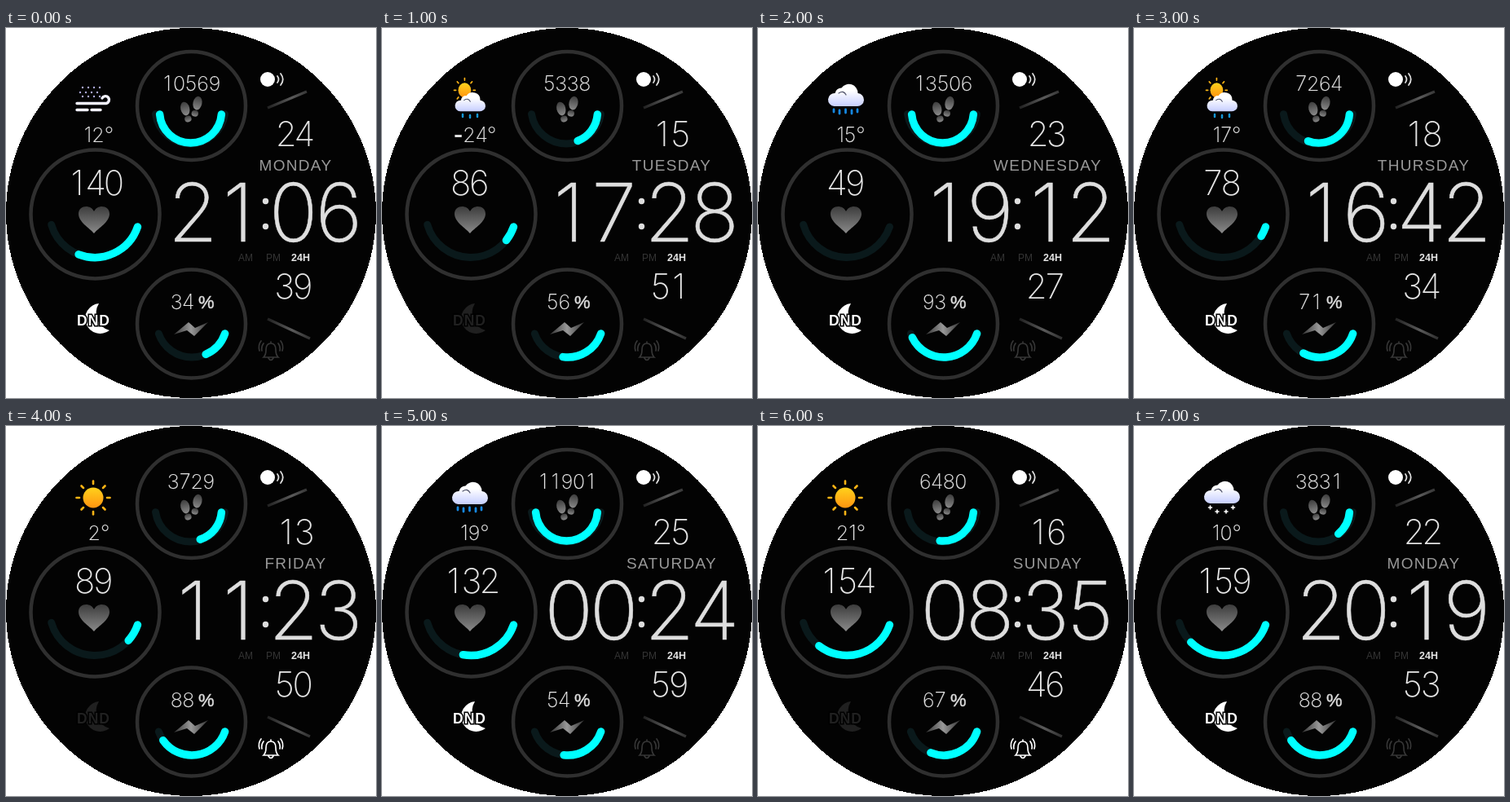
Animation, 454 px wide and 454 px high, one loop 8000 ms. Source, as an HTML page:

```html
<!DOCTYPE html>
<html lang="en">
<head>
<meta charset="utf-8">
<title>Watch face</title>
<style>
html, body { margin: 0; width: 100%; height: 100%; overflow: hidden; background: #fff; }
svg { display: block; width: 454px; height: 454px; }
text { fill: #e4e4e4; }
.num { font-family: Inter, Lato, sans-serif; font-weight: 200; text-anchor: middle; }
.time { font-size: 99px; fill: #dedede; stroke: #dedede; stroke-width: .6px; }
.big { font-size: 42px; }
.small { font-size: 25px; stroke: #e4e4e4; stroke-width: .15px; }
.label { font-family: "Liberation Sans", Arial, sans-serif; }
#day { font-size: 19px; letter-spacing: 1.3px; fill: #999; text-anchor: middle; }
.mode { font-size: 12px; fill: #343434; }
.line { fill: none; stroke-linecap: round; }
.ring { fill: none; stroke: #2f2f2f; stroke-width: 4.5; }
.track { stroke: #0a191b; stroke-width: 9; }
.bar { stroke: #00ffff; stroke-width: 9.5; }
#weather > g { display: none; }
</style>
</head>
<body>
<svg viewBox="0 0 454 454">
  <defs>
    <linearGradient id="grey" x2="0" y2="1"><stop stop-color="#3c3c3c"/><stop offset="1" stop-color="#8a8a8a"/></linearGradient>
    <linearGradient id="shine"><stop stop-color="#333"/><stop offset=".5" stop-color="#999"/><stop offset="1" stop-color="#333"/></linearGradient>
    <linearGradient id="sky" x2="0" y2="1"><stop offset=".3" stop-color="#fff"/><stop offset="1" stop-color="#c6ceff"/></linearGradient>
    <linearGradient id="sunFill" x2="0" y2="1"><stop stop-color="#ffd21c"/><stop offset="1" stop-color="#ff9410"/></linearGradient>
    <linearGradient id="fade" gradientUnits="userSpaceOnUse" x1="321" x2="371"><stop stop-color="#222"/><stop offset=".6" stop-color="#5a5a5a"/><stop offset="1" stop-color="#333"/></linearGradient>
    <g id="cloud">
      <path d="M93.500 95a8 8 0 0 1 1-16a8 8 0 0 1 8-6.500a11 11 0 0 1 20 6.500a8 8 0 0 1-1 16z" fill="url(#sky)"/>
      <path class="line" d="M99 79q6-4 9 2" stroke="#55586e" stroke-width="1.300"/>
    </g>
    <g id="sunny">
      <circle cx="107" cy="88" r="12.500" fill="url(#sunFill)"/>
      <g id="rays" class="line" stroke="#ffb515" stroke-width="2.600"></g>
    </g>
  </defs>

  <circle cx="227" cy="227" r="227" fill="#030303" shape-rendering="crispEdges"/>
  <circle class="ring" cx="227.500" cy="95.500" r="66.500"/>
  <circle class="ring" cx="109.500" cy="228.500" r="79"/>
  <circle class="ring" cx="227.500" cy="363" r="66.500"/>
  <g id="arcs" class="line"></g>

  <g fill="url(#grey)">
    <path d="M108 252C102 245 89 238 89 228C89 217 104 216 108 225C112 216 127 217 127 228C127 238 114 245 108 252z"/>
    <g transform="rotate(-14 220 100)"><ellipse cx="220" cy="99" rx="5.500" ry="8.500"/><ellipse cx="220.500" cy="112" rx="4.200" ry="3.800"/></g>
    <g transform="rotate(12 234 92)"><ellipse cx="235" cy="92" rx="5.500" ry="8.500"/><ellipse cx="234.500" cy="105" rx="4.200" ry="3.800"/></g>
  </g>
  <path d="M206 376L224 361L232 368L248 361L231 378L222 371z" fill="url(#shine)"/>
  <g stroke="url(#fade)" stroke-width="3.300"><path d="M321 98L369 78M321 357L373 381"/></g>

  <circle cx="321" cy="63" r="9" fill="#fff"/>
  <path class="line" d="M333 59q3 4 0 8M337 56q5.500 7 0 14" stroke="#ddd" stroke-width="1.800"/>

  <g id="weather">
    <g id="wind">
      <path class="line" d="M94 73H117M91 79H114M94 84H117" stroke="#a9a6d8" stroke-width="2.400" stroke-dasharray="0 7"/>
      <path class="line" d="M87 92.500H123a4.500 4.500 0 1 0-5-6.500M87 100.500H100M105 100.500H116" stroke="#f3f2ff" stroke-width="3.400"/>
    </g>
    <g id="mixed">
      <use href="#sunny" transform="translate(34 13) scale(.63 .72)"/>
      <use href="#cloud" transform="translate(16.500 21.500) scale(.85)"/>
      <path class="line" d="M99 106v3M108 107v3M117 106v3" stroke="#1597d8" stroke-width="2.500"/>
    </g>
    <g id="rain">
      <use href="#cloud" y="1"/>
      <path class="line" d="M93 100v3M100 101v4M107.500 100v4M115 101v4M122 100v3" stroke="#1687e0" stroke-width="2.800"/>
    </g>
    <g id="sun"><use href="#sunny"/></g>
    <g id="snow">
      <use href="#cloud"/>
      <path class="line" d="M91.500 100h4M93.500 98v4M100 105h4M102 103v4M111 105h4M113 103v4M119.500 100h4M121.500 98v4" stroke="#fff" stroke-width="1.600"/>
    </g>
  </g>

  <g id="dnd">
    <path d="M114 338A18.500 18.500 0 1 0 127 371A22 22 0 0 1 114 338z" fill="currentColor"/>
    <text class="label" x="87" y="364.500" font-size="17.500" font-weight="700" letter-spacing="1" stroke="#000" stroke-width="3" paint-order="stroke" style="fill:currentColor">DND</text>
  </g>
  <g id="alarm" class="line" stroke="currentColor" stroke-width="1.700">
    <path d="M316 404q3-3 3-9q0-8 6-8t6 8q0 6 3 9zM322 405q3 5 6 0M325 387v-2M316 387q-3 4-2 9M334 387q3 4 2 9M313 384q-4 5-2 12M337 384q4 5 2 12"/>
  </g>

  <g fill="#dedede"><circle cx="318.500" cy="212.500" r="3.700"/><circle cx="318.500" cy="243.500" r="3.700"/></g>
  <text id="day" class="label" x="355.500" y="175"></text>
  <g class="label">
    <text class="mode" x="285" y="286">AM</text>
    <text class="mode" x="319" y="286">PM</text>
    <text x="350" y="286" font-size="12.500" font-weight="700">24H</text>
  </g>
  <text id="hours" class="num time" y="262"></text>
  <text id="minutes" class="num time" y="262"></text>
  <text id="date" class="num big" y="145"></text>
  <text id="sec" class="num big" y="332"></text>
  <text id="steps" class="num small" y="77"></text>
  <text id="pulse" class="num big" y="205"></text>
  <text id="temp" class="num small" x="114" y="140"></text>
  <text id="charge" class="num small" y="345"></text>
  <text class="label" x="236" y="344" font-size="22" stroke="#ccc" stroke-width=".5">%</text>
</svg>
<script>
const $ = id => document.getElementById(id);
const make = (tag, attrs, parent) => {
  const el = document.createElementNS("http://www.w3.org/2000/svg", tag);
  for (const k in attrs) el.setAttribute(k, attrs[k]);
  return parent.appendChild(el);
};
const polar = (x, y, r, deg) => {
  const a = deg * Math.PI / 180;
  return (x + r * Math.cos(a)).toFixed(2) + " " + (y + r * Math.sin(a)).toFixed(2);
};
const arc = (x, y, r, from, to) =>
  to ? `M${polar(x, y, r, from)}A${r} ${r} 0 0 1 ${polar(x, y, r, to)}` : "";

// Sets digits in equal slots around a centre
function put(id, value, center, pitch) {
  const chars = [...String(value)];
  $(id).textContent = value;
  $(id).setAttribute("x", chars.map((c, i) => center + (i - (chars.length - 1) / 2) * pitch).join(" "));
}

// Gauges: centre, radius and start angle; tracks are drawn first
const gauges = {
  steps: [226.5, 103, 38, 4.5],
  pulse: [109, 226, 55.5, 19],
  charge: [228, 361, 43, 19]
};
for (const d of [arc(226, 99, 43, 9, 171), arc(...gauges.pulse, 164), arc(...gauges.charge, 161)])
  make("path", { class: "track", d }, $("arcs"));
const bars = {};
for (const k in gauges) bars[k] = make("path", { class: "bar" }, $("arcs"));

for (let a = 0; a < 360; a += 45)
  make("path", { d: `M${polar(107, 88, 17, a)}L${polar(107, 88, 20.5, a)}` }, $("rays"));

// day, date, hours, minutes, seconds, [steps, angle], [pulse, angle], [charge, angle], temp, weather, dnd, alarm
const states = [
  ["MONDAY", 24, "21", "06", 39, [10569, 175.5], [140, 111], [34, 66.5], "12", "wind", 1, 0],
  ["TUESDAY", 15, "17", "28", 51, [5338, 69], [86, 38.5], [56, 98], "-24", "mixed", 0, 0],
  ["WEDNESDAY", 23, "19", "12", 27, [13506, 175.5], [49, 0], [93, 154], "15", "rain", 1, 0],
  ["THURSDAY", 18, "16", "42", 34, [7264, 110], [78, 32], [71, 118], "17", "mixed", 1, 0],
  ["FRIDAY", 13, "11", "23", 50, [3729, 72], [89, 42], [88, 145], "2", "sun", 0, 1],
  ["SATURDAY", 25, "00", "24", 59, [11901, 175.5], [132, 100], [54, 96.5], "19", "rain", 1, 0],
  ["SUNDAY", 16, "08", "35", 46, [6480, 95], [154, 128], [67, 112], "21", "sun", 0, 1],
  ["MONDAY", 22, "20", "19", 53, [3831, 50.5], [159, 135], [88, 145], "10", "snow", 1, 0]
];

function show([day, date, hours, minutes, sec, steps, pulse, charge, temp, weather, dnd, alarm]) {
  $("day").textContent = day;
  put("date", date, 355, 22.5);
  put("sec", sec, 353, 22.5);
  put("hours", hours, 257, 55.5);
  put("minutes", minutes, 380.5, 55.5);
  put("steps", steps[0], 227, 14.5);
  put("pulse", pulse[0], pulse[0] > 99 ? 110 : 108, 22.5);
  put("charge", charge[0], 216.5, 14.5);
  for (const [k, [, end]] of Object.entries({ steps, pulse, charge }))
    bars[k].setAttribute("d", arc(...gauges[k], end));
  $("temp").innerHTML = temp.replace("-", '<tspan font-weight="700">-</tspan>') + "°";
  for (const g of $("weather").children) g.style.display = g.id === weather ? "inline" : "none";
  $("dnd").style.color = dnd ? "#fff" : "#202020";
  $("alarm").style.color = alarm ? "#fff" : "#363636";
}

const start = performance.now();
let last = -1;
function tick() {
  const i = Math.floor((performance.now() - start) / 1000) % states.length;
  if (i !== last) show(states[last = i]);
  requestAnimationFrame(tick);
}
tick();
</script>
</body>
</html>
```
